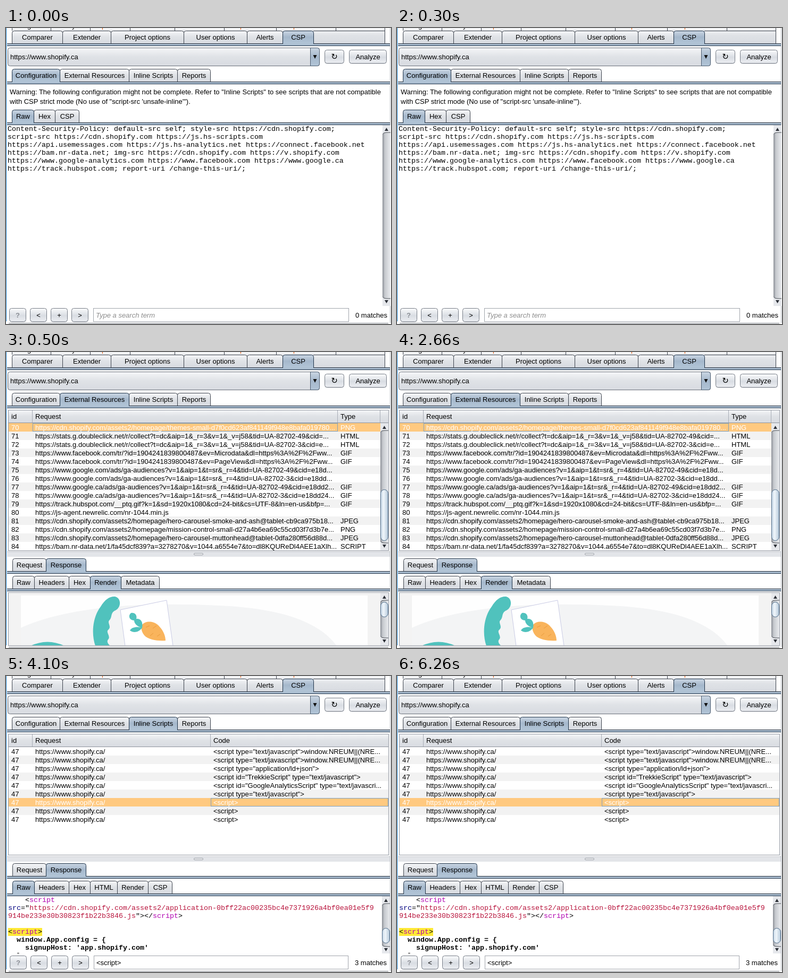
An HTML page that plays this animation: 724x558 px, repeating every 7.7 s.

```html
<!DOCTYPE html>
<html lang="en">
<head>
<meta charset="utf-8">
<title>CSP panel</title>
<style>
  html, body { margin: 0; width: 100%; height: 100%; overflow: hidden; background: #fff; }
  svg { display: block; }
  text { font: 13px "Liberation Sans", Arial, sans-serif; white-space: pre; }
  .mono { font: 13.333px "Liberation Mono", "Courier New", monospace; }
  .bold { font-weight: bold; }
  .middle { text-anchor: middle; }
  .icon { font: 15px "DejaVu Sans", sans-serif; }
  .italic { font-style: italic; }
</style>
</head>
<body>
<svg id="stage" width="724" height="558" viewBox="0 0 724 558">
  <defs>
    <linearGradient id="grey" x2="0" y2="1">
      <stop stop-color="#f5f6f8"/><stop offset=".5" stop-color="#dfe2e6"/><stop offset="1" stop-color="#d8dbe1"/>
    </linearGradient>
    <linearGradient id="button" x2="0" y2="1">
      <stop stop-color="#fafbfc"/><stop offset=".55" stop-color="#d9dde3"/><stop offset="1" stop-color="#eceef2"/>
    </linearGradient>
    <linearGradient id="blue" x2="0" y2="1">
      <stop stop-color="#c9d5e2"/><stop offset=".5" stop-color="#a5b8cc"/><stop offset="1" stop-color="#b1c4d6"/>
    </linearGradient>
    <linearGradient id="track">
      <stop stop-color="#8d9198"/><stop offset=".3" stop-color="#c6c9ce"/><stop offset="1" stop-color="#e9ebee"/>
    </linearGradient>
    <linearGradient id="thumb">
      <stop stop-color="#c3d4e4"/><stop offset=".4" stop-color="#f0f6fb"/><stop offset="1" stop-color="#b4c8da"/>
    </linearGradient>
  </defs>
</svg>
<script>
const LOOP = 7700;
const STARTS = [0, 500, 4100];
const TAB_BORDER = '#3c424c';
const SELECTED_BORDER = '#1d3147';
const PANE_BORDER = '#9297a1';

const escapeText = s => s.replace(/&/g, '&amp;').replace(/</g, '&lt;');
const rect = (x, y, w, h, fill, extra = '') =>
  `<rect x="${x}" y="${y}" width="${w}" height="${h}" fill="${fill}" ${extra}/>`;
const box = (x, y, w, h, fill, stroke, r = 0) =>
  rect(x + .5, y + .5, w - 1, h - 1, fill, `stroke="${stroke}" rx="${r}"`);
const path = (d, fill, extra = '') => `<path d="${d}" fill="${fill}" ${extra}/>`;
const text = (x, y, s, fill = '#000', cls = '') =>
  `<text x="${x}" y="${y}" fill="${fill}" class="${cls}">${escapeText(s)}</text>`;
const mono = (x, y, s, fill, cls = '') => text(x, y, s, fill, 'mono ' + cls);

function band(y) {
  return rect(2, y, 720, 1, '#26303d') + rect(2, y + 1, 720, 3, '#a9bccf') + rect(2, y + 4, 720, 1, '#1d3147');
}

// edges holds the left edge of each tab plus the right edge of the last one
function tabs(baseline, edges, labels, selected) {
  const top = baseline - 16.5, bottom = baseline + 7;
  const shapes = labels.map((label, i) => {
    const l = edges[i] + .5, r = edges[i + 1] + .5, on = i === selected;
    const d = `M${l} ${bottom}V${top + 4}Q${l} ${top} ${l + 4} ${top}H${r - 4}Q${r} ${top} ${r} ${top + 4}V${bottom}`;
    return path(d, on ? 'url(#blue)' : 'url(#grey)', `stroke="${on ? SELECTED_BORDER : TAB_BORDER}"`) +
      text((l + r) / 2, baseline, label, '#000', 'middle');
  });
  // the selected tab goes last so its border wins, then opens into the band
  shapes.push(...shapes.splice(selected, 1));
  const left = edges[selected] + 1;
  return shapes.join('') + band(bottom) + rect(left, bottom, edges[selected + 1] - left, 1, '#b1c4d6');
}

function button(x, y, w, h, label, cls = '', fill = '#000') {
  return rect(x + 1, y + 1.5, w - 2, h - 1, '#c3c7ce', 'rx="4"') +
    box(x, y, w, h, 'url(#button)', '#777d87', 4) +
    text(x + w / 2, y + h / 2 + 4.5, label, fill, 'middle ' + cls);
}

function scrollbar(x, y, h, thumbY, thumbH) {
  const mid = x + 7.5, end = y + h;
  const cap = (edge, s) =>
    path(`M${x} ${edge}V${edge + 17 * s}Q${x + 2} ${edge + 14 * s} ${x + 7} ${edge + 14 * s}H${x + 15}V${edge}Z`, '#e6e8ec') +
    path(`M${x + .5} ${edge + 17 * s}Q${x + 2} ${edge + 14 * s} ${x + 7} ${edge + 14 * s}H${x + 15}`, 'none', 'stroke="#4a4e55"') +
    path(`M${mid - 3.5} ${edge + 11 * s}h7l-3.5 ${-6 * s}z`, '#2b2f36');
  return rect(x, y, 15, h, 'url(#track)') +
    (thumbH ? box(x, thumbY, 15, thumbH, 'url(#thumb)', '#4d6a87', 7) : '') +
    cap(y, 1) + cap(end, -1);
}

function splitter(y) {
  return rect(2, y, 720, 10, '#e3e5e9') + rect(2, y, 720, 1, '#c4c7cd') +
    box(353, y + 3, 18, 4, '#f7f8fa', '#9599a0', 1.5);
}

function tableHeader(edges, labels) {
  return rect(4, 109, 716, 25, 'url(#grey)') + rect(4, 133, 716, 1, '#8e939c') +
    edges.map(x => rect(x, 110, 1, 23, '#a8adb6')).join('') +
    labels.map(([x, s]) => text(x, 126, s)).join('');
}

// cells: rows of strings; focus: [left, width] of the outlined cell
function tableRows(cells, columns, width, selected, focus) {
  return cells.map((row, i) => {
    const y = 134 + 16 * i, on = i === selected;
    return rect(5, y, width, 16, on ? '#ffc980' : i % 2 ? '#f2f2f2' : '#fff') +
      (on ? box(focus[0], y, focus[1], 16, 'none', '#7d9fbd') : '') +
      row.map((s, c) => text(columns[c], y + 13, s, on ? '#fff' : '#000')).join('');
  }).join('');
}

function searchBar(dx, dy, query, matches) {
  const y = 528 + dy;
  return rect(2, 524 + dy, 720, 32, '#fff') +
    ['?', '<', '+', '>'].map((s, i) =>
      button(6 + 39 * i + dx, y, 32, 26, s, i ? '' : 'bold', i ? '#000' : '#8a8e95')).join('') +
    box(164 + dx, y, 481 - 2 * dx, 26, '#fff', '#a0a4ab') +
    (query ? text(169 + dx, 546 + dy, query) : text(169, 546, 'Type a search term', '#8c8c8c', 'italic')) +
    text(657 - dx, 546 + dy, matches);
}

function frameAndToolbar() {
  const upper = [11, 84, 158, 233, 317, 410, 508, 620];
  return rect(0, 0, 724, 558, '#fff') +
    rect(11, 0, 702, 29, 'url(#grey)') +
    upper.map(x => rect(x, 0, 1, 5, TAB_BORDER)).join('') +
    text(40, 0, 'g') + text(124, 0, 'y') + text(180, 0, 'p', '#e05a10') +
    text(440, 0, 'p', '#e05a10') + text(540, 0, 'p', '#e05a10') +
    rect(578, 5, 134, 1, TAB_BORDER) + rect(712, 0, 1, 29, TAB_BORDER) +
    tabs(22, [11, 106, 197, 334, 453, 520, 578],
      ['Comparer', 'Extender', 'Project options', 'User options', 'Alerts', 'CSP'], 5) +
    box(3, 37, 587, 35, 'url(#grey)', '#686e78', 4) +
    path('M572.5 37.5H585.5Q589.5 37.5 589.5 41.5V67.5Q589.5 71.5 585.5 71.5H572.5Z', 'url(#blue)', 'stroke="#4b5b6e"') +
    path('M577.5 51h7l-3.5 7z', '#111') +
    text(8, 59, 'https://www.shopify.ca') +
    button(599, 41, 37, 26, '↻', 'icon') + button(645, 41, 71, 26, 'Analyze') +
    rect(0, 0, 1, 553, '#2486d2') + rect(722, 0, 1, 556, '#b5b9c0') + rect(5, 556, 714, 1, '#777c84');
}

const mainTabs = selected => tabs(94, [11, 101, 231, 322, 384],
  ['Configuration', 'External Resources', 'Inline Scripts', 'Reports'], selected);

function configuration() {
  const policy = [
    'Content-Security-Policy: default-src self; style-src https://cdn.shopify.com;',
    'script-src https://cdn.shopify.com https://js.hs-scripts.com',
    'https://api.usemessages.com https://js.hs-analytics.net https://connect.facebook.net',
    'https://bam.nr-data.net; img-src https://cdn.shopify.com https://v.shopify.com',
    'https://www.google-analytics.com https://www.facebook.com https://www.google.ca',
    'https://track.hubspot.com; report-uri /change-this-uri/;'
  ];
  return mainTabs(0) +
    text(7, 125, 'Warning: The following configuration might not be complete. Refer to "Inline Scripts" to see scripts that are not compatible') +
    text(7, 143, 'with CSP strict mode (No use of "script-src \'unsafe-inline\'").') +
    tabs(171, [11, 52, 92, 137], ['Raw', 'Hex', 'CSP'], 0) +
    policy.map((s, i) => mono(3, 194 + 15 * i, s)).join('') +
    scrollbar(708, 183, 341) + searchBar(0, 0, '', '0 matches');
}

function carrotPicture() {
  const teal = '#50c2bd';
  return rect(4, 453, 700, 101, '#f3f3f3') + rect(28, 459, 652, 95, '#fefefe') +
    path('M28 520C110 482 250 470 400 478C520 483 590 510 622 554H28Z', '#f3f4f5') +
    path('M46 554Q78 539 110 554Z', teal) +
    path('M168 554C160 530 163 500 178 480C186 466 196 460 205 461C217 464 217 481 206 487C196 491 200 500 195 505C189 510 199 517 193 523C186 528 198 536 192 542Q188 547 196 554Z', teal) +
    path('M215 486L302 468L314 554H224Z', '#fff', 'stroke="#c9cbe4"') +
    path('M256 514C264 505 281 508 288 517C297 526 300 537 300 544C286 545 268 543 260 534C255 528 253 520 256 514Z', '#f9b45c') +
    path('M263 519l7-3M276 521l7-5M271 535l6-5M284 536l6-4', 'none', 'stroke="#e99a3c"') +
    path('M256 520C247 518 241 512 241 506C232 506 229 497 235 492C243 490 247 497 245 503C253 502 258 508 256 520C249 529 240 530 233 525C236 518 248 517 256 520Z', teal);
}

function externalResources() {
  const rows = [
    ['https://cdn.shopify.com/assets2/homepage/themes-small-d7f0cd623af841149f948e8bafa019780...', 'PNG'],
    ['https://stats.g.doubleclick.net/r/collect?t=dc&aip=1&_r=3&v=1&_v=j58&tid=UA-82702-49&cid=...', 'HTML'],
    ['https://stats.g.doubleclick.net/r/collect?t=dc&aip=1&_r=3&v=1&_v=j58&tid=UA-82702-3&cid=e...', 'HTML'],
    ['https://www.facebook.com/tr/?id=1904241839800487&ev=Microdata&dl=https%3A%2F%2Fww...', 'GIF'],
    ['https://www.facebook.com/tr/?id=1904241839800487&ev=PageView&dl=https%3A%2F%2Fww...', 'GIF'],
    ['https://www.google.com/ads/ga-audiences?v=1&aip=1&t=sr&_r=4&tid=UA-82702-49&cid=e18d...', ''],
    ['https://www.google.com/ads/ga-audiences?v=1&aip=1&t=sr&_r=4&tid=UA-82702-3&cid=e18dd...', ''],
    ['https://www.google.ca/ads/ga-audiences?v=1&aip=1&t=sr&_r=4&tid=UA-82702-49&cid=e18dd2...', 'GIF'],
    ['https://www.google.ca/ads/ga-audiences?v=1&aip=1&t=sr&_r=4&tid=UA-82702-3&cid=e18dd24...', 'GIF'],
    ['https://track.hubspot.com/__ptq.gif?k=1&sd=1920x1080&cd=24-bit&cs=UTF-8&ln=en-us&bfp=...', 'GIF'],
    ['https://js-agent.newrelic.com/nr-1044.min.js', ''],
    ['https://cdn.shopify.com/assets2/homepage/hero-carousel-smoke-and-ash@tablet-cb9ca975b18...', 'JPEG'],
    ['https://cdn.shopify.com/assets2/homepage/mission-control-small-d27a4b6ea69c55cd03f7d3b7e...', 'PNG'],
    ['https://cdn.shopify.com/assets2/homepage/hero-carousel-muttonhead@tablet-0dfa280ff56d88d...', 'JPEG'],
    ['https://bam.nr-data.net/1/fa45dcf839?a=3278270&v=1044.a6554e7&to=dl8KQUReDl4AEE1aXlh...', 'SCRIPT']
  ].map((row, i) => [String(70 + i), ...row]);
  return mainTabs(1) +
    tableHeader([49, 623, 703], [[10, 'id'], [55, 'Request'], [629, 'Type']]) +
    tableRows(rows, [10, 55, 629], 699, 0, [50, 574]) +
    box(4, 109, 716, 266, 'none', PANE_BORDER) + scrollbar(704, 134, 240, 259, 97) +
    splitter(376) +
    tabs(406, [12, 75, 150], ['Request', 'Response'], 1) +
    tabs(439, [12, 53, 118, 158, 216, 288], ['Raw', 'Headers', 'Hex', 'Render', 'Metadata'], 3) +
    carrotPicture() + scrollbar(704, 454, 99, 471, 29) +
    box(4, 453, 716, 101, 'none', PANE_BORDER) + rect(2, 554, 720, 2, '#fff');
}

function inlineScripts() {
  const rows = [
    '<script type="text/javascript">window.NREUM||(NRE...',
    '<script type="text/javascript">window.NREUM||(NRE...',
    '<script type="application/ld+json">',
    '<script id="TrekkieScript" type="text/javascript">',
    '<script id="GoogleAnalyticsScript" type="text/javascri...',
    '<script type="text/javascript">',
    '<script>', '<script>', '<script>'
  ].map(code => ['47', 'https://www.shopify.ca/', code]);
  const tag = '#b000b0', url = '#b8143c';
  // pieces: [column, string, colour] on an 8 px character grid
  const code = (line, pieces, cls) =>
    pieces.map(([col, s, fill]) => mono(4 + 8 * col, 426 + 15 * line, s, fill, cls)).join('');
  return mainTabs(2) +
    tableHeader([49, 384], [[10, 'id'], [55, 'Request'], [390, 'Code']]) +
    tableRows(rows, [10, 55, 390], 714, 6, [385, 334]) +
    box(4, 109, 716, 229, 'none', PANE_BORDER) + splitter(340) +
    tabs(370, [12, 75, 150], ['Request', 'Response'], 1) +
    tabs(403, [12, 53, 118, 158, 209, 267, 312], ['Raw', 'Headers', 'Hex', 'HTML', 'Render', 'CSP'], 0) +
    rect(4, 475, 64, 15, '#ffe936') +
    code(0, [[4, '<'], [5, 'script', tag]]) +
    code(1, [[0, 'src', '#00007f'], [3, '="'],
      [5, 'https://cdn.shopify.com/assets2/application-0bff22ac00235bc4e7371926a4bf0ea01e5f9', url]]) +
    code(2, [[0, '914be233e30b30823f1b22b3846.js', url], [30, '"></'], [34, 'script', tag], [40, '>']]) +
    code(4, [[0, '<'], [1, 'script', tag], [7, '>']]) +
    code(5, [[2, 'window.App.config = {']], 'bold') +
    code(6, [[4, "signupHost: 'app.shopify.com'"]], 'bold') +
    code(7, [[2, '};']], 'bold') +
    scrollbar(707, 415, 109, 475, 29) + searchBar(1, -1, '<script>', '3 matches');
}

const stage = document.getElementById('stage');
stage.insertAdjacentHTML('beforeend', frameAndToolbar() +
  [configuration, externalResources, inlineScripts].map(view => `<g class="view">${view()}</g>`).join(''));
const views = [...stage.querySelectorAll('.view')];

function draw() {
  const time = performance.now() % LOOP;
  const current = STARTS.filter(start => start <= time).length - 1;
  views.forEach((view, i) => view.style.display = i === current ? '' : 'none');
  requestAnimationFrame(draw);
}
draw();
</script>
</body>
</html>
```
